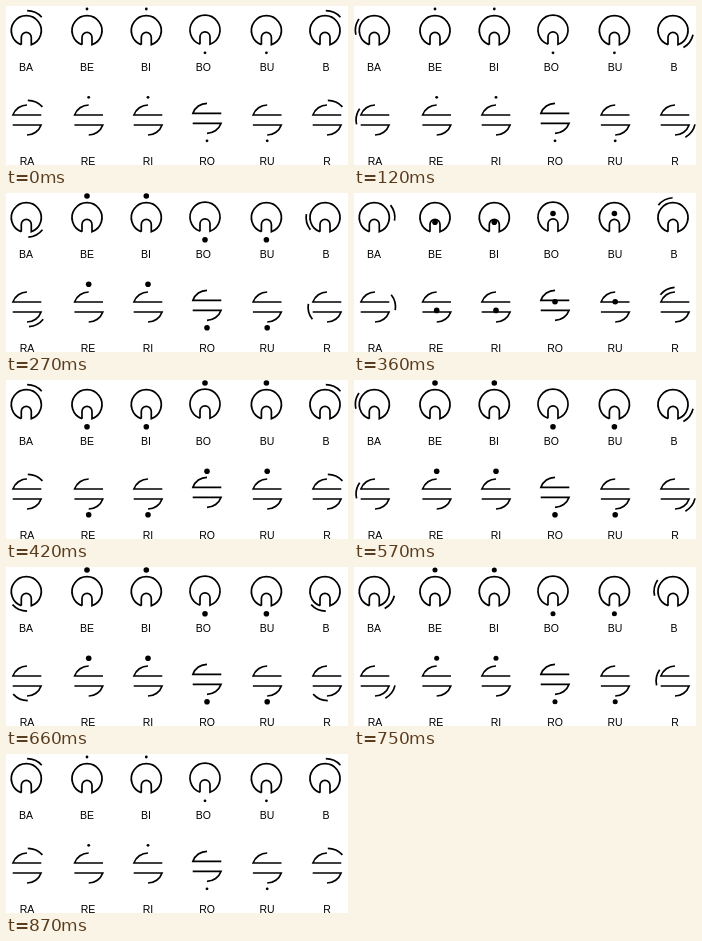
Animation of 342 by 159 pixels, one loop 900 ms. Source, as an HTML page:

```html
<!DOCTYPE html>
<html>
<head>
<meta charset="utf-8">
<style>
  html, body { margin: 0; width: 100%; height: 100%; overflow: hidden; background: #fff; }
  svg { display: block; width: 342px; height: 159px; }
  path { fill: none; stroke: #000; stroke-width: 1.7; }
  text { font: 10.5px "Liberation Sans", Arial, sans-serif; text-anchor: middle; }
</style>
</head>
<body>
<svg viewBox="0 0 342 159"></svg>
<script>
const svg = document.querySelector('svg');
const STEP = 30, STEPS = 30;
const VOWELS = ['A', 'E', 'I', 'O', 'U', ''];
// lift: how much higher the O sign of a row sits.
const ROWS = [
  { letter: 'B', y: 24.6, lift: 0.6, arcY: 24.4, top: 3, bottom: 46.8, base: 65.2,
    xs: [20.3, 81, 140.3, 199, 260.4, 319], labels: [20, 81, 140, 197.3, 261, 320],
    glyph: 'M-5 14.2V6.8A5 5 0 0 1 5 6.8V14.2A15 15 0 1 0 -5 14.2' },
  { letter: 'R', y: 114, lift: 1.7, arcY: 114, top: 91.3, bottom: 134.8, base: 159,
    xs: [21, 82.7, 142, 201, 261.2, 321], labels: [21, 82, 142, 201, 261, 321],
    glyph: 'M0 -15A15 15 0 0 0 -14.1 -5H14.3M-14.3 5H14.1A15 15 0 0 1 0 15' }
];

function add(tag, attrs, text = '') {
  const el = document.createElementNS('http://www.w3.org/2000/svg', tag);
  for (const name in attrs) el.setAttribute(name, attrs[name]);
  el.textContent = text;
  svg.append(el);
  return el;
}

const arcs = [], dots = [];
for (const row of ROWS) {
  VOWELS.forEach((vowel, i) => {
    const x = row.xs[i];
    const y = row.y - (vowel === 'O' ? row.lift : 0);
    add('path', { d: row.glyph, transform: `translate(${x} ${y})` });
    add('text', { x: row.labels[i], y: row.base }, row.letter + vowel);
    if (i === 0 || i === 5) {
      const el = add('path', { d: 'M18 -8A19.7 19.7 0 0 1 18 8' });
      arcs.push({ el, x: x + 0.8, y: row.arcY, dir: i ? 1 : -1 });
    } else {
      const [from, to] = i < 3 ? [row.top, row.bottom] : [row.bottom, row.top];
      dots.push({ el: add('circle', { cx: x }), from, to });
    }
  });
}

const ramp = (k, a, b) => Math.min(1, Math.max(0, (k - a) / (b - a)));

function draw(now) {
  const k = Math.floor(now / STEP) % STEPS;
  const turn = 360 * (k % 15) / 14;
  for (const { el, x, y, dir } of arcs)
    el.setAttribute('transform', `translate(${x} ${y}) rotate(${-66 + dir * turn})`);

  // Dots swell, cross over and back, then shrink.
  const r = 1.4 + 1.4 * (ramp(k, 4, 9) - ramp(k, 24, 29));
  const shift = ramp(k, 9, 14) - ramp(k, 14, 19);
  for (const { el, from, to } of dots) {
    el.setAttribute('r', r);
    el.setAttribute('cy', from + (to - from) * shift);
  }
}

const start = performance.now();
function tick() {
  draw(performance.now() - start);
  requestAnimationFrame(tick);
}
tick();
</script>
</body>
</html>
```
